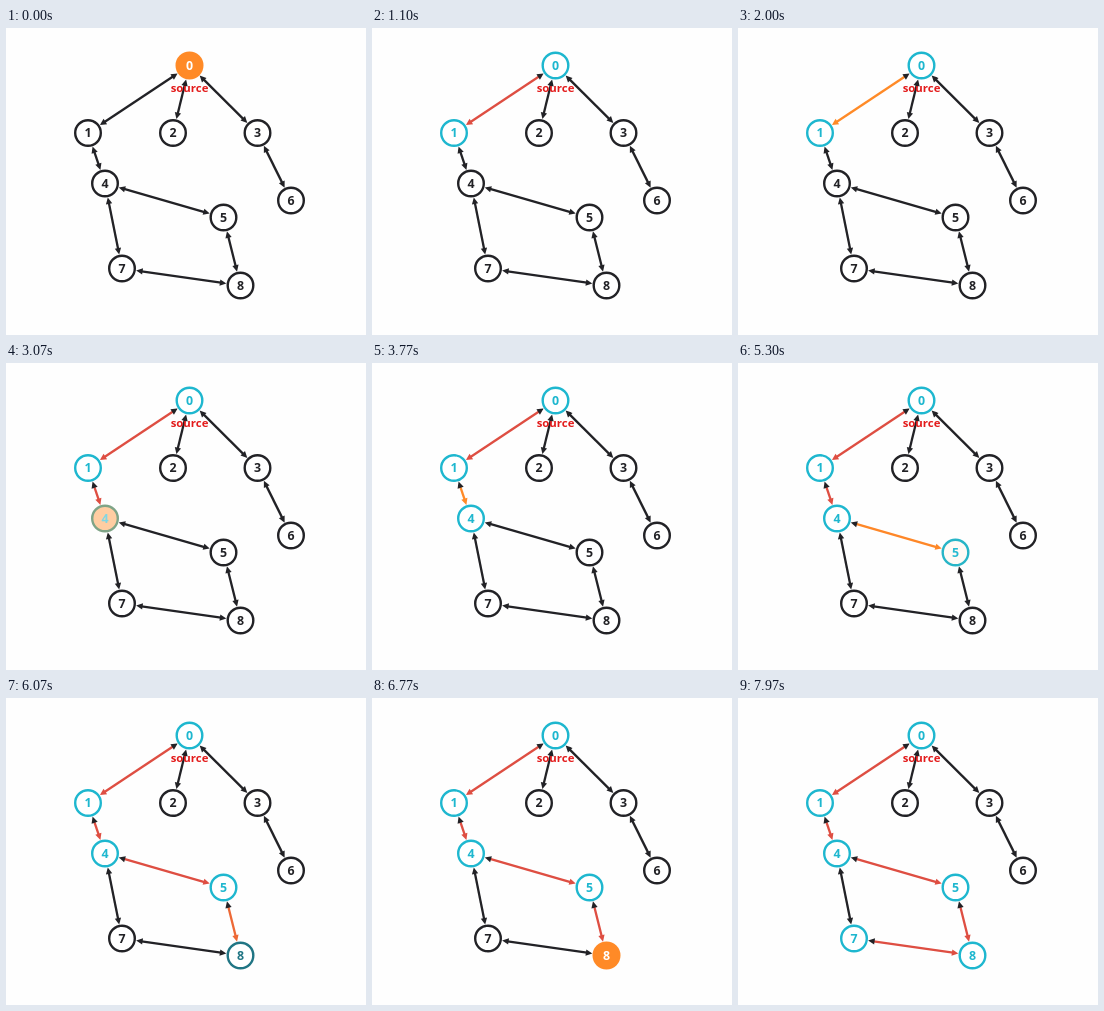
These frames come from a looping animation (360x307 px, 8 s). An HTML page:

```html
<!DOCTYPE html>
<html lang="en">
<head>
<meta charset="utf-8">
<title>Depth-first search</title>
<style>
  html, body { margin: 0; width: 100%; height: 100%; overflow: hidden; background: #fefefe; }
  svg { display: block; width: 360px; height: 307px; }
  text { font-family: "Open Sans", "Noto Sans", sans-serif; font-weight: 700; text-anchor: middle; }
</style>
</head>
<body>
<svg id="stage" viewBox="0 0 360 307"></svg>
<script>
const LOOP = 8000, STEP = 425, FADE = 200, FIRST = 860;
const DARK = [34, 34, 38], WHITE = [255, 255, 255], RED = [222, 78, 66],
      ORANGE = [255, 138, 39], CYAN = [30, 183, 207];
const PLAIN = { fill: WHITE, line: DARK, text: DARK };
const SEEN = { fill: WHITE, line: CYAN, text: CYAN };
const ACTIVE = { fill: ORANGE, line: ORANGE, text: WHITE };

const nodes = [[183.5, 37.5], [82, 105], [167, 105], [251.5, 105], [99, 155.5],
               [217.5, 189.5], [285, 172.5], [116, 240.5], [234.5, 257.5]];
const edges = [[0, 1], [0, 2], [0, 3], [1, 4], [3, 6], [4, 5], [4, 7], [5, 8], [7, 8]];
const visits = [0, 1, 4, 5, 8, 7];

const stage = document.getElementById("stage");
function add(tag, attrs, text) {
  const el = document.createElementNS("http://www.w3.org/2000/svg", tag);
  for (const k in attrs) el.setAttribute(k, attrs[k]);
  if (text !== undefined) el.textContent = text;
  return stage.appendChild(el);
}
const css = c => `rgb(${c.map(Math.round)})`;
const mix = (a, b, p) => a.map((v, i) => v + (b[i] - v) * p);

// Arrow head with its tip at (x, y), pointing along (ux, uy)
function head(x, y, ux, uy) {
  const bx = x - ux * 6.5, by = y - uy * 6.5;
  return add("path", {
    d: `M${x} ${y}L${bx - uy * 3.2} ${by + ux * 3.2}L${bx + uy * 3.2} ${by - ux * 3.2}Z`,
    fill: css(DARK)
  });
}

const edgeViews = edges.map(([a, b]) => {
  const [ax, ay] = nodes[a], [bx, by] = nodes[b];
  const len = Math.hypot(bx - ax, by - ay);
  const ux = (bx - ax) / len, uy = (by - ay) / len;
  const at = d => [ax + ux * d, ay + uy * d];
  const [x1, y1] = at(18), [x2, y2] = at(len - 18);
  const line = add("line", { x1, y1, x2, y2, stroke: css(DARK), "stroke-width": 2.3 });
  head(...at(14.3), -ux, -uy);
  return { line, tip: head(...at(len - 14.3), ux, uy), keys: [[-LOOP, DARK]] };
});

const nodeViews = nodes.map(([cx, cy], i) => ({
  ring: add("circle", { cx, cy, r: 12.8, "stroke-width": 2.4 }),
  label: add("text", { x: cx, y: cy + 4.4, "font-size": 12.4 }, i),
  keys: [[-LOOP, PLAIN]]
}));
add("text", { x: 183.5, y: 63.5, "font-size": 11.4, fill: "#e31b1b" }, "source");

// Each visit: reach the node, highlight it, look back along the edge, move on
nodeViews[0].keys = [[-LOOP, ACTIVE], [FIRST - STEP, SEEN]];
visits.slice(1).forEach((v, i) => {
  const u = visits[i], t = FIRST + i * 4 * STEP;
  nodeViews[v].keys.push([t, SEEN], [t + STEP, ACTIVE], [t + 2 * STEP, SEEN]);
  const edge = edgeViews[edges.findIndex(e => e.includes(u) && e.includes(v))];
  edge.keys.push([t - STEP, ORANGE], [t, RED], [t + 2 * STEP, ORANGE], [t + 3 * STEP, RED]);
});

function phase(keys, t) {
  let i = keys.length - 1;
  while (i > 0 && keys[i][0] > t) i--;
  return [keys[Math.max(0, i - 1)][1], keys[i][1], Math.min(1, (t - keys[i][0]) / FADE)];
}

function draw(t) {
  for (const { line, tip, keys } of edgeViews) {
    const color = css(mix(...phase(keys, t)));
    line.setAttribute("stroke", color);
    tip.setAttribute("fill", color);
  }
  for (const { ring, label, keys } of nodeViews) {
    const [from, to, p] = phase(keys, t);
    const color = part => css(mix(from[part], to[part], p));
    ring.setAttribute("fill", color("fill"));
    ring.setAttribute("stroke", color("line"));
    label.setAttribute("fill", color("text"));
  }
}

const start = performance.now();
function tick() {
  draw((performance.now() - start) % LOOP);
  requestAnimationFrame(tick);
}
tick();
</script>
</body>
</html>
```
